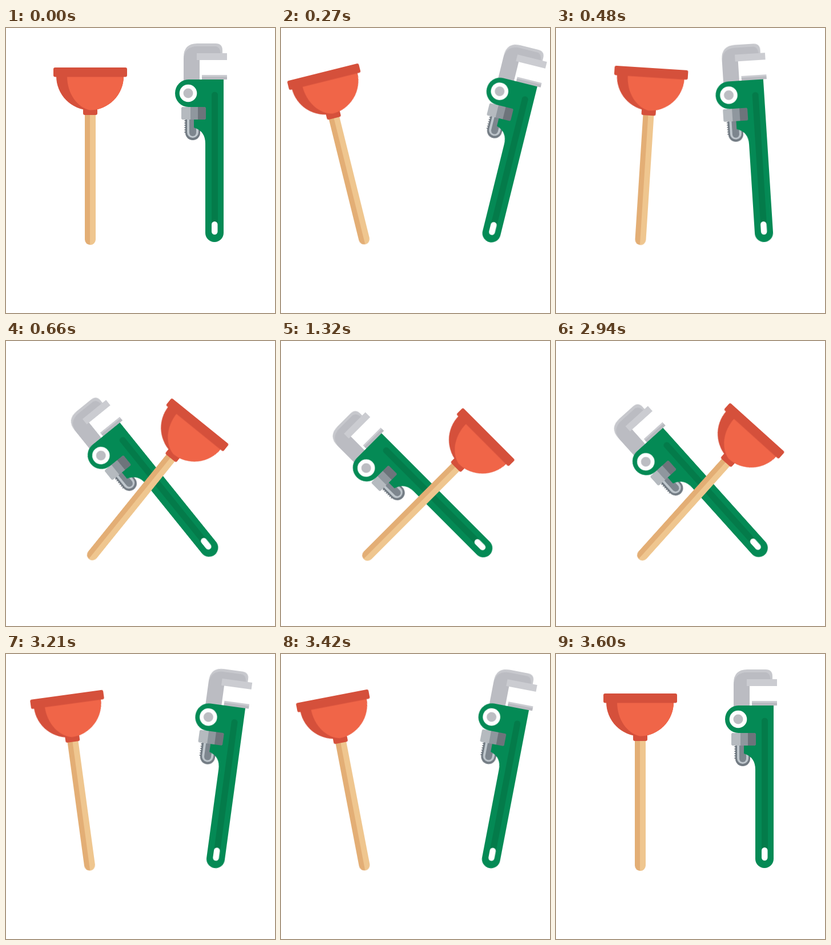
These frames come from a looping animation (471 px wide and 498 px high, 4500 ms). An HTML page:

```html
<!DOCTYPE html>
<html lang="en">
<head>
<meta charset="utf-8">
<title>Crossing tools</title>
<style>
  html, body { margin: 0; width: 100%; height: 100%; overflow: hidden; background: #fff; }
  svg { display: block; width: 100%; height: 100%; }

  .tool { animation: swing 4500ms infinite; }
  .plunger { --dir: 1; transform-origin: 143.5px 377px; }
  .wrench { --dir: -1; transform-origin: 364.5px 373px; }

  /* Wind up outwards, cross, rest, then the same path backwards. */
  @keyframes swing {
    0% { transform: rotate(0deg); }
    0.667% { transform: rotate(0deg); animation-timing-function: cubic-bezier(.25, 0, .58, 1); }
    7.333% { transform: rotate(calc(var(--dir) * -15deg)); animation-timing-function: cubic-bezier(.333, 0, .62, 1); }
    16.667% { transform: rotate(calc(var(--dir) * 44.85deg)); animation-timing-function: ease-out; }
    29.333%, 51.333% { transform: rotate(calc(var(--dir) * 45deg)); animation-timing-function: ease-in; }
    64% { transform: rotate(calc(var(--dir) * 44.85deg)); animation-timing-function: cubic-bezier(.38, 0, .667, 1); }
    73.333% { transform: rotate(calc(var(--dir) * -15deg)); animation-timing-function: cubic-bezier(.42, 0, .75, 1); }
    80%, 100% { transform: rotate(0deg); }
  }
</style>
</head>
<body>
<svg viewBox="0 0 471 498">
  <g class="tool wrench">
    <!-- upper jaw -->
    <path fill="#c7c8cd" d="M311 92V51Q311 27 335 27H367Q379 27 379 39V46H339V92Z"/>
    <path fill="#bbbcc2" d="M311 92V54Q313 32 335 32H366Q375 32 376 46H339V92Z"/>
    <path fill="#cbccd1" d="M334 44H387V56H334Z"/>
    <!-- lower jaw -->
    <path fill="#b9bac0" d="M343 82H387V90H343Z"/>
    <path fill="#cbccd1" d="M343 82H387V85H343Z"/>
    <!-- screw -->
    <path fill="#727b83" d="M314 158H340V183A13 13 0 0 1 314 183Z"/>
    <path stroke="#727b83" stroke-width="2" stroke-dasharray="2 2" d="M313.5 161V184"/>
    <path fill="#bfc7cd" d="M317 158H337V182A10 10 0 0 1 317 182Z"/>
    <path fill="#7d868e" d="M321 158H333V183A6 6 0 0 1 321 183Z"/>
    <!-- body -->
    <path fill="#048a55" d="M319.5 90H381V358A16 16 0 0 1 349 358V202Q349 180 329 174V138H319.5A23.5 24 0 0 1 319.5 90Z"/>
    <path fill="#047b4a" d="M360 346V117A5.5 5.5 0 0 1 371 117V346Z"/>
    <rect x="360" y="338" width="10.5" height="23" rx="5.2" fill="#fff"/>
    <!-- nut -->
    <path fill="#8f979e" d="M309 138H348L350 140V158L348 160H309L307 158V140Z"/>
    <path fill="#b5babf" d="M309 138H323V160H309L307 158V140Z"/>
    <path fill="#6d747b" d="M336 138H348L350 140V158L348 160H336Z"/>
    <!-- badge -->
    <circle cx="319" cy="114" r="15.3" fill="#fff"/>
    <circle cx="319" cy="114" r="8.5" fill="#bcbdc2"/>
  </g>

  <g class="tool plunger">
    <path fill="#e3ae75" d="M138 150H147.5V379A9.5 9.5 0 0 1 138 369.5Z"/>
    <path fill="#efc68f" d="M147 150H157V369.5A9.5 9.5 0 0 1 147 379Z"/>
    <path fill="#d5503b" d="M135 140H160V149Q160 152 157 152H138Q135 152 135 149Z"/>
    <path fill="#d5503b" d="M88 84H206A59 59.5 0 0 1 88 84Z"/>
    <path fill="#f06548" d="M107 84H206A59 59.5 0 0 1 147 143.5C125 139 107 115 107 84Z"/>
    <rect x="83" y="69" width="129" height="16.5" rx="3" fill="#d5503b"/>
  </g>
</svg>
</body>
</html>
```
